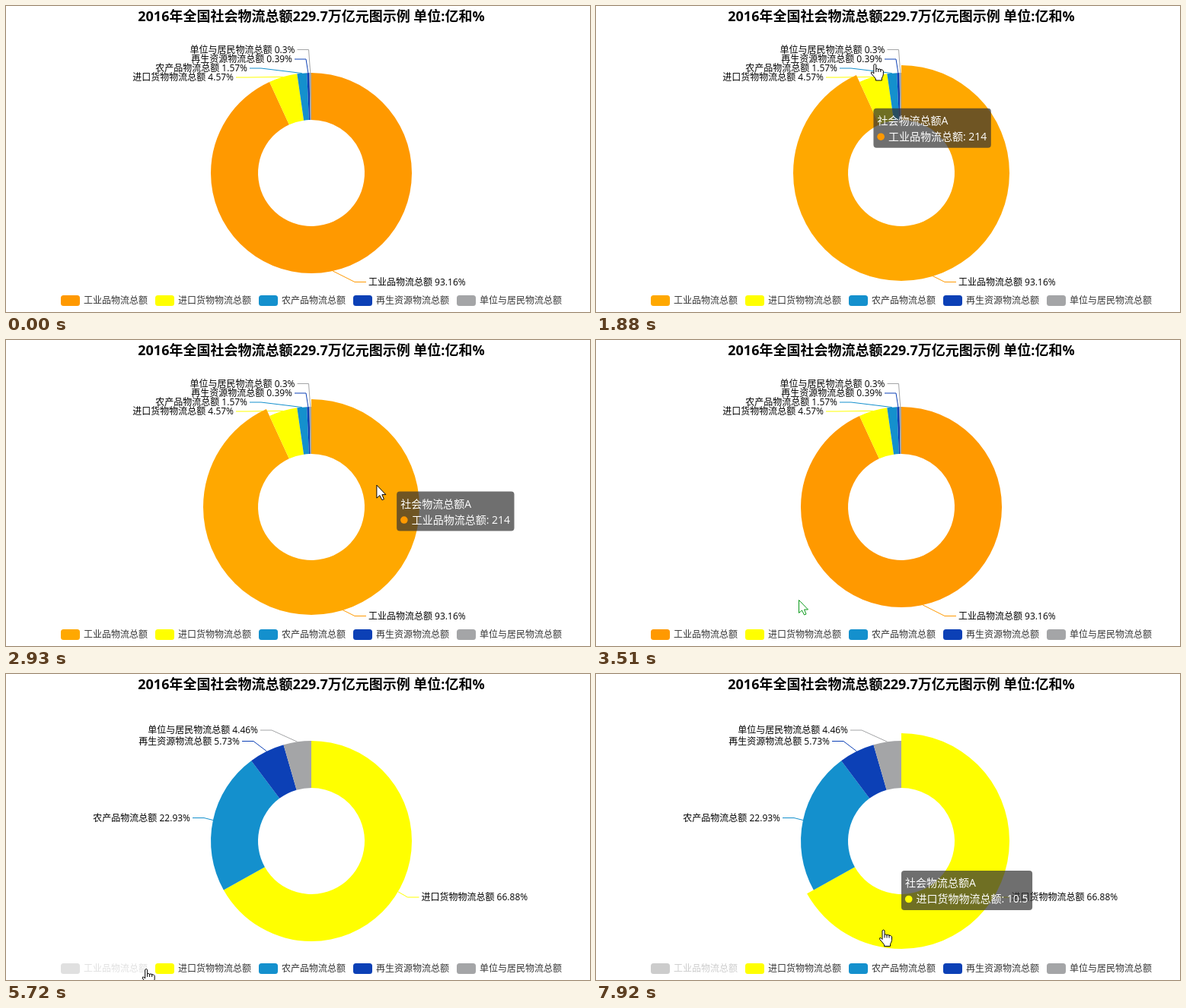
Write an HTML page with a canvas that moves like this. It is 767x403 px and loops after 8 s.

```html
<!DOCTYPE html>
<html lang="zh-CN">
<head>
<meta charset="utf-8">
<style>
html, body { margin: 0; width: 100%; height: 100%; overflow: hidden; background: #fff; }
canvas { display: block; }
</style>
</head>
<body>
<canvas id="stage" width="767" height="403"></canvas>
<script>
const ctx = document.getElementById('stage').getContext('2d');
const FONT = '"Open Sans", "Noto Sans CJK SC", "Noto Sans CJK", sans-serif';
const LOOP = 8000, CX = 401, CY = 220, INNER = 70, OUTER = 132, GROW = 10;
const REMOVE_AT = 4816, REMOVE_MS = 300, HOVER_MS = 300;

// full / rest: elbow of the label line with all slices, and without the first one
const slices = [
  { name: '工业品物流总额', value: 214, color: '#ff9900', hot: '#ffa800', legendX: 72,
    full: { x: 458, y: 363.5, dir: 1 } },
  { name: '进口货物物流总额', value: 10.5, color: '#ffff00', hot: '#ffff00', legendX: 196,
    full: { x: 317, y: 94, dir: -1 }, rest: { x: 527.5, y: 294, dir: 1 } },
  { name: '农产品物流总额', value: 3.6, color: '#1490cd', legendX: 332,
    full: { x: 335, y: 82, dir: -1 }, rest: { x: 260, y: 189.5, dir: -1 } },
  { name: '再生资源物流总额', value: 0.9, color: '#0c40b6', legendX: 456,
    full: { x: 394, y: 70, dir: -1 }, rest: { x: 325, y: 88.5, dir: -1 } },
  { name: '单位与居民物流总额', value: 0.7, color: '#a4a5a7', legendX: 592,
    full: { x: 397.5, y: 57.5, dir: -1 }, rest: { x: 349, y: 74, dir: -1 } },
];

// the screen refreshes in bursts: start, end, number of updates
const bursts = [
  [800, 1580, 11], [1650, 2450, 11], [2490, 3270, 11], [3330, 4120, 11], [4200, 4270, 2],
  [4850, 5120, 4], [5500, 6240, 11], [6870, 7520, 9], [7690, 7920, 4],
];

// time, x, y, hand
const pointerKeys = [
  [800, 476, 304, 1], [956, 410, 230, 0], [1112, 343, 142, 1], [1190, 343, 142, 1],
  [1580, 345, 110, 1], [1900, 374, 62, 0], [2100, 410, 74, 0], [2170, 436, 104, 1],
  [2450, 480, 160, 0], [2490, 488, 172, 0], [2650, 495, 178, 0], [3050, 480, 200, 1],
  [3330, 315, 308, 0], [3488, 266, 342, 0], [3900, 200, 372, 0], [4080, 160, 386, 1],
  [5500, 160, 386, 1], [5700, 192, 388, 0], [5800, 215, 388, 1], [6100, 318, 382, 1],
  [6240, 321, 374, 0], [6870, 321, 374, 0], [7050, 300, 386, 1], [7250, 335, 367, 0],
  [7370, 360, 345, 1], [7520, 379, 331, 1], [7690, 380, 332, 1], [7920, 377, 336, 1],
];

const tooltips = [
  { slice: 0, keys: [[800, 496, 324], [956, 470, 290], [1112, 386, 178], [1400, 362, 155], [1905, 365, 130]] },
  { slice: 0, keys: [[2150, 442, 114], [2490, 458, 128], [2800, 515, 195], [3100, 508, 212], [3360, 466, 240]] },
  { slice: 1, keys: [[7390, 399, 259], [7690, 399, 259], [7920, 401, 259], [LOOP, 401, 259]] },
];

// times at which a slice turns highlighted, then plain, and so on
const toggles = [
  [800, 900, 1010, 1905, 2150, 3340, 4080],
  [5760, 7150, 7370],
];

const arrow = new Path2D('M0 0V17L4 13.5L7 19.5L9.5 18.5L7 12.5H12Z');
const hand = new Path2D('M-1.5 13V1.5Q0-.5 1.5 1.5V7Q3 5.5 4.5 7.5Q6 6 7.5 8Q9.5 7 11 9.5V14Q10.5 17 9 19V22H1V20Q-2 16-4.8 13Q-5.5 10.5-3.5 11Z');

const lerp = (a, b, p) => a + (b - a) * p;
const clamp = v => Math.max(0, Math.min(1, v));
const cubicOut = k => 1 - (1 - k) ** 3;
const elasticOut = k => k >= 1 ? 1 : k <= 0 ? 0 :
  1 + 2 ** (-10 * k) * Math.sin((k - 0.1) * 2 * Math.PI / 0.4);

function refreshedTime(t) {
  let shown = 0;
  for (const [start, end, count] of bursts) {
    if (t < start) break;
    const step = (end - start) / (count - 1);
    shown = Math.min(end, start + Math.floor((t - start) / step + 1e-6) * step);
  }
  return shown;
}

function sample(keys, t) {
  let i = 0;
  while (i < keys.length - 1 && keys[i + 1][0] <= t) i++;
  const a = keys[i], b = keys[i + 1] || a;
  const p = b === a ? 0 : clamp((t - a[0]) / (b[0] - a[0]));
  return { x: lerp(a[1], b[1], p), y: lerp(a[2], b[2], p), hand: a[3] };
}

function highlight(index, t) {
  const past = (toggles[index] || []).filter(time => time <= t);
  if (!past.length) return { on: false, amount: 0 };
  const on = past.length % 2 === 1;
  const eased = elasticOut((t - past[past.length - 1]) / HOVER_MS);
  return { on, amount: on ? eased : 1 - eased };
}

function text(str, x, y, { size = 12, color = '#000', align = 'left', weight = '' } = {}) {
  ctx.font = `${weight} ${size}px ${FONT}`;
  ctx.fillStyle = color;
  ctx.textAlign = align;
  ctx.fillText(str, x, y + size * 0.36);
}

function roundBox(x, y, w, h, r, color) {
  ctx.fillStyle = color;
  ctx.beginPath();
  ctx.roundRect(x, y, w, h, r);
  ctx.fill();
}

// start and end of each slice as fractions of a turn
function spans(list) {
  const total = list.reduce((sum, s) => sum + s.value, 0);
  let at = 0;
  return list.map(s => {
    const start = at;
    at += s.value / total;
    return { start, end: at, percent: +(s.value / total * 100).toFixed(2) };
  });
}
const fullSpans = spans(slices);
const restSpans = [null, ...spans(slices.slice(1))];

const onRim = ({ start, end }) => {
  const angle = (start + end) * Math.PI;
  return { x: CX + OUTER * Math.sin(angle), y: CY - OUTER * Math.cos(angle) };
};

function drawPie(t) {
  const removed = t >= REMOVE_AT;
  const p = removed ? cubicOut(clamp((t - REMOVE_AT) / REMOVE_MS)) : 0;
  const parts = slices.map((slice, i) => {
    if (removed && i === 0) return null;
    const a = fullSpans[i], b = restSpans[i] || a;
    const from = slice.full, to = slice.rest || from;
    const rimA = onRim(a), rimB = onRim(b);
    return {
      slice, light: highlight(i, t),
      start: lerp(a.start, b.start, p), end: lerp(a.end, b.end, p),
      rim: { x: lerp(rimA.x, rimB.x, p), y: lerp(rimA.y, rimB.y, p) },
      x: lerp(from.x, to.x, p), y: lerp(from.y, to.y, p), dir: lerp(from.dir, to.dir, p),
      align: (removed ? to : from).dir > 0 ? 'left' : 'right',
      label: `${slice.name} ${(removed ? b : a).percent}%`,
    };
  }).filter(Boolean);

  ctx.lineWidth = 1;
  for (const { slice, rim, x, y, dir } of parts) {
    ctx.strokeStyle = slice.color;
    ctx.beginPath();
    ctx.moveTo(rim.x, rim.y);
    ctx.lineTo(x, y);
    ctx.lineTo(x + 15 * dir, y);
    ctx.stroke();
  }
  for (const { slice, light, start, end } of parts) {
    const a = (start - 0.25) * 2 * Math.PI, b = (end - 0.25) * 2 * Math.PI;
    ctx.fillStyle = light.on ? slice.hot : slice.color;
    ctx.beginPath();
    ctx.arc(CX, CY, OUTER + GROW * light.amount, a, b);
    ctx.arc(CX, CY, INNER, b, a, true);
    ctx.fill();
  }
  for (const { label, x, y, dir, align } of parts) text(label, x + 18 * dir, y, { align });
}

function drawLegend(t) {
  slices.forEach((slice, i) => {
    let color = highlight(i, t).on ? slice.hot : slice.color, ink = '#333';
    if (i === 0 && t >= REMOVE_AT) color = ink = t < 5650 ? '#e0e0e0' : '#ccc';
    roundBox(slice.legendX, 381, 25, 14, 3.5, color);
    text(slice.name, slice.legendX + 30, 388, { color: ink });
  });
}

function drawTooltip(t) {
  const tip = tooltips.find(({ keys }) => t >= keys[0][0] && t < keys[keys.length - 1][0]);
  if (!tip) return;
  const { x, y } = sample(tip.keys, t);
  const { name, value, color, hot } = slices[tip.slice];
  const line = `${name}: ${value}`, style = { size: 14, color: '#fff' };
  ctx.font = `14px ${FONT}`;
  roundBox(x, y, ctx.measureText(line).width + 25, 52, 4, 'rgba(50,50,50,0.7)');
  text('社会物流总额A', x + 5, y + 16, style);
  ctx.fillStyle = tip.slice ? hot : color;
  ctx.beginPath();
  ctx.arc(x + 9.7, y + 37.5, 4.8, 0, 2 * Math.PI);
  ctx.fill();
  text(line, x + 19.5, y + 37, style);
}

function drawPointer(t) {
  if (t < pointerKeys[0][0]) return;
  const pointer = sample(pointerKeys, t);
  const shape = pointer.hand ? hand : arrow;
  ctx.save();
  ctx.translate(pointer.x + 0.5, pointer.y + 0.5);
  ctx.fillStyle = '#fff';
  ctx.strokeStyle = t > 3320 && t < 4000 ? '#0a9a1a' : '#000';
  ctx.fill(shape);
  ctx.stroke(shape);
  if (pointer.hand) {
    ctx.beginPath();
    for (const x of [1.5, 4.5, 7.5]) {
      ctx.moveTo(x, 7);
      ctx.lineTo(x, 11);
    }
    ctx.stroke();
  }
  ctx.restore();
}

function draw(now) {
  const t = refreshedTime(now % LOOP);
  ctx.fillStyle = '#fff';
  ctx.fillRect(0, 0, 767, 403);
  text('2016年全国社会物流总额229.7万亿元图示例 单位:亿和%', CX, 14,
    { size: 18, weight: 'bold', align: 'center' });
  drawPie(t);
  drawLegend(t);
  drawTooltip(t);
  drawPointer(t);
  requestAnimationFrame(draw);
}
requestAnimationFrame(draw);
</script>
</body>
</html>
```
